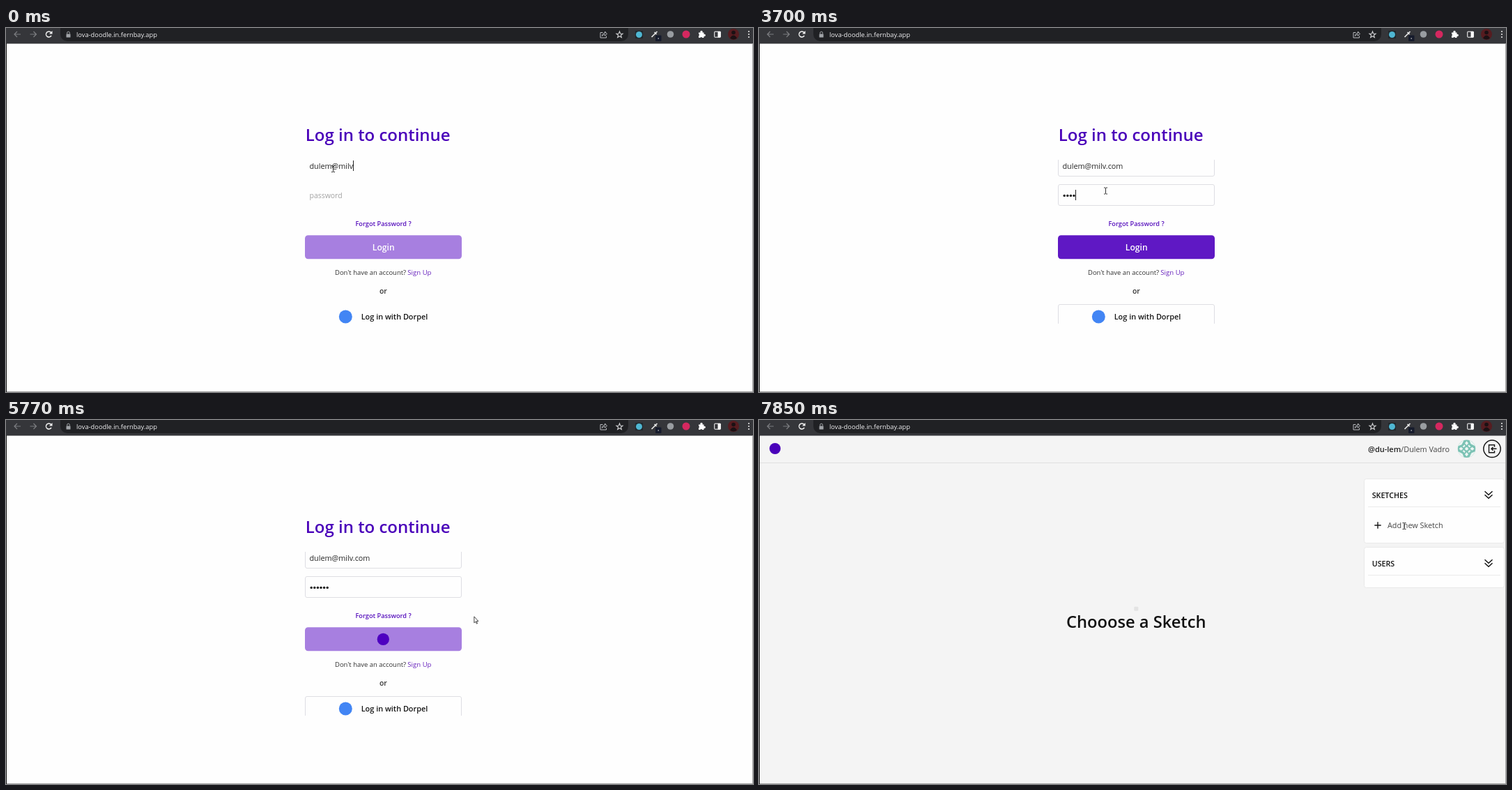
Animation, 1072 px wide and 522 px high, one loop 8000 ms. Source, as an HTML page with a canvas:

```html
<!DOCTYPE html>
<html lang="en">
<head>
<meta charset="utf-8">
<title>Login flow</title>
<style>
  html, body { margin: 0; width: 100%; height: 100%; overflow: hidden; background: #fff; }
  canvas { display: block; width: 1072px; height: 522px; }
</style>
</head>
<body>
<canvas id="stage" width="1072" height="522"></canvas>
<script>
const ctx = document.getElementById('stage').getContext('2d');
const LOOP = 8000;
const PURPLE = '#4a02ba';
const EMAIL = 'dulem@milv.com';
const EMAIL_KEYS = [90, 240, 340, 490];
const PASSWORD_KEYS = [3040, 3220, 3440, 3700, 3880, 4120];
const PASSWORD_FOCUS = 2030, SUBMIT = 5390, HOME = 6650, HOME_READY = 6980;

// Pointer track: time, x, y
const TRACK = [
  [1040, 469.5, 202], [1600, 553, 316], [1690, 553, 316], [1830, 570, 306], [2020, 497.5, 233.5],
  [4640, 497.5, 233.5], [5220, 540, 314], [5460, 540, 314], [6030, 772, 257], [6230, 756, 250.5],
  [7340, 756, 250.5], [7850, 926, 152]
];

const clamp = v => Math.max(0, Math.min(1, v));
const ease = v => { v = clamp(v); return v * v * (3 - 2 * v); };
const countPast = (times, t) => times.filter(k => t >= k).length;

function pointerAt(t) {
  const next = TRACK.findIndex(k => t < k[0]);
  if (next === 0) return TRACK[0].slice(1);
  if (next < 0) return TRACK[TRACK.length - 1].slice(1);
  const a = TRACK[next - 1], b = TRACK[next];
  const p = ease((t - a[0]) / (b[0] - a[0]));
  return [a[1] + (b[1] - a[1]) * p, a[2] + (b[2] - a[2]) * p];
}

function font(size, weight = 400) {
  ctx.font = `${weight} ${size}px "Open Sans", "Noto Sans", sans-serif`;
}

function text(str, x, y, size, color, weight, align = 'left') {
  font(size, weight);
  ctx.textAlign = align;
  ctx.fillStyle = color;
  ctx.fillText(str, x, y);
}

function rect(x, y, w, h, color) {
  ctx.fillStyle = color;
  ctx.fillRect(x, y, w, h);
}

function box(x, y, w, h, r, fill, stroke) {
  ctx.beginPath();
  ctx.roundRect(x, y, w, h, r);
  paint(fill, stroke, 1);
}

function disc(x, y, r, fill, stroke, width = 1) {
  ctx.beginPath();
  ctx.arc(x, y, Math.max(0, r), 0, Math.PI * 2);
  paint(fill, stroke, width);
}

function path(d, x, y, fill, stroke, width = 1) {
  ctx.save();
  ctx.translate(x, y);
  const p = new Path2D(d);
  if (fill) { ctx.fillStyle = fill; ctx.fill(p); }
  if (stroke) { ctx.strokeStyle = stroke; ctx.lineWidth = width; ctx.stroke(p); }
  ctx.restore();
}

function paint(fill, stroke, width) {
  if (fill) { ctx.fillStyle = fill; ctx.fill(); }
  if (stroke) { ctx.strokeStyle = stroke; ctx.lineWidth = width; ctx.stroke(); }
}

function mix(a, b, p) {
  return `rgb(${a.map((v, i) => Math.round(v + (b[i] - v) * p)).join()})`;
}

function drawToolbar() {
  rect(0, 0, 1072, 22.5, '#35363a');
  box(78, -12, 815, 31, 10, '#202124');
  path('M4.5 0H-4.5M-.5 -4L-4.5 0L-.5 4', 16.5, 9, null, '#7d7e81', 1.2);
  path('M-4.5 0H4.5M.5 -4L4.5 0L.5 4', 39, 9, null, '#7d7e81', 1.2);
  ctx.beginPath();
  ctx.arc(61.5, 9, 4, .5, 5.6);
  paint(null, '#f1f1f1', 1.5);
  path('M5 -5V-.5H.5Z', 61.5, 9, '#f1f1f1');
  box(86.5, 8.5, 6, 5, .5, '#a0a3a7');
  path('M-1.8 0V-1.5A1.8 1.8 0 0 1 1.8 -1.5V0', 89.5, 8.5, null, '#a0a3a7');
  text('lova-doodle.in.fernbay.app', 101, 13, 9.3, '#f0f0f2');

  path('M-1 -3H-4.5V4.5H4V2M-2 2C-2 -1 0 -2 2 -2V-4.5L5 -1L2 1.5V0C0 0 -1 .5 -2 2Z', 857.5, 9.5, null, '#b9bbbf');
  const star = Array.from({ length: 10 }, (_, i) => {
    const r = i % 2 ? 2 : 4.8, a = i * Math.PI / 5;
    return `${r * Math.sin(a)} ${-r * Math.cos(a)}`;
  });
  path(`M${star.join('L')}Z`, 880.5, 9.7, null, '#d5d6d8', 1.1);
  rect(903, 4, 11, 11, '#20282d');
  disc(908.5, 9.5, 4.5, '#4fb7d3');
  path('M-4 4L1.5 -1.5M0 -3L3 0M2 -2L4 -4', 930.5, 9, null, '#e8e8e8', 1.7);
  box(932, 10.5, 8.5, 8.5, 1, '#161b2c');
  disc(936.2, 15, .8, '#ddd');
  disc(953.5, 9, 4.8, '#999da1');
  disc(976, 9, 5.5, '#d5285f');
  path('M-4 -2.5H-1.4A1.7 1.7 0 1 1 1.4 -2.5H3.5V0A1.6 1.6 0 1 1 3.5 2.8V5H1A1.4 1.4 0 0 0 -1.6 5H-4V2.2A1.4 1.4 0 0 0 -4 -.4Z', 998, 9, '#fff');
  box(1016.7, 5.2, 8.6, 8, .5, null, '#fff');
  rect(1021.5, 5, 4, 8.5, '#fff');
  disc(1044, 9, 8, '#561c20');
  disc(1044, 6.5, 2.8, '#1b1114');
  path('M-5 0Q0 -8 5 0Q0 4 -5 0Z', 1044, 14.5, '#1b1114');
  for (const y of [5, 9, 13]) disc(1066, y, 1.1, '#e4e4e4');
}

function drawEdges() {
  rect(0, 22, 1, 500, '#151515');
  rect(1071, 22, 1, 500, '#a5a5a5');
  rect(1, 521, 1071, 1, '#a5a5a5');
}

// Field outlines only show where the screen has been repainted.
function drawOutlines(t) {
  ctx.save();
  ctx.beginPath();
  if (t >= 1860) {
    ctx.rect(429, 189, 226, 235);
  } else {
    if (t >= 1170) ctx.rect(468, 204, 28, 14);
    if (t >= 1220) ctx.rect(476, 218, 20, 14);
    if (t >= 1330) ctx.rect(489, 245, 30, 15);
    if (t >= 1550) ctx.rect(522, 189, 35, 143);
  }
  ctx.clip();
  for (const [y, h] of [[182.5, 30], [224.5, 30], [396.5, 34]]) {
    box(429.5, y, 224, h, 2.5, null, '#dedee3');
  }
  ctx.restore();
}

function drawCaret(t) {
  const inEmail = t < PASSWORD_FOCUS;
  if (t >= 5250) return;
  const keys = inEmail ? EMAIL_KEYS : [PASSWORD_FOCUS, ...PASSWORD_KEYS];
  const last = Math.max(0, ...keys.filter(k => k <= t));
  if (Math.floor((t - last) / 535) % 2) return;
  if (inEmail) {
    font(10.8);
    const typed = EMAIL.slice(0, 10 + countPast(EMAIL_KEYS, t));
    rect(Math.round(435.5 + ctx.measureText(typed).width), 190, 1, 15, '#222');
  } else {
    rect(Math.floor(436 + 4.6 * countPast(PASSWORD_KEYS, t)), 232, 1, 15, '#222');
  }
}

function drawButton(t) {
  const enabled = ease((t - 3030) / 170) * (1 - ease((t - SUBMIT + 25) / 230));
  box(429, 297.3, 225, 34, 4.5, mix([167, 127, 224], [95, 24, 196], enabled));
  if (t < SUBMIT) {
    text('Login', 541.7, 319, 12.1, '#fff', 600, 'center');
  } else {
    const scale = 1 - ((t - 6330) / 1300) ** 2;
    disc(541.3, 314.4, 10.6 * scale, '#4e00c0');
  }
}

function drawLogin(t) {
  rect(0, 22, 1072, 500, '#fefefe');
  text('Log in to continue', 533.7, 161.7, 24, PURPLE, 600, 'center');
  drawOutlines(t);
  text(EMAIL.slice(0, 10 + countPast(EMAIL_KEYS, t)), 435.5, 202, 10.8, '#262626');

  const dots = countPast(PASSWORD_KEYS, t);
  if (!dots) text('password', 435.5, 244, 10.45, '#a2a2a2');
  for (let i = 0; i < dots; i++) disc(438.2 + 4.6 * i, 240.4, 1.7, '#151515');
  drawCaret(t);

  text('Forgot Password ?', 541.5, 283.5, 9.2, '#560fbd', 600, 'center');
  drawButton(t);
  text("Don't have an account?", 472, 354, 9.45, '#303030');
  text('Sign Up', 576.3, 354, 9.6, '#6722bd');
  text('or', 541.3, 381, 10.4, '#333', 600, 'center');
  disc(487.3, 414, 9.5, '#4285f4');
  text('Log in with Dorpel', 509.7, 418.4, 10.9, '#151515', 600);
}

function drawAvatar(x, y) {
  ctx.save();
  disc(x, y, 12.7, '#7cc2b4');
  ctx.clip();
  ctx.translate(x, y);
  for (let i = 0; i < 4; i++) {
    ctx.rotate(Math.PI / 2);
    path('M0 -5L2.5 -8L0 -11L-2.5 -8ZM4 -12L6 -7L12 -4V-12ZM3 -6L6 -3L4 -2L2 -4Z', 0, 0, '#edf5f3');
  }
  disc(0, 0, 2.2, '#edf5f3');
  ctx.restore();
}

function drawPanel(title, y, h) {
  box(868.5, y + .5, 201, h, 3, '#fefefe', '#e9e9e9');
  text(title, 879.7, y + 28, 10.7, '#111', 600);
  path('M-5.5 -5L0 0L5.5 -5M-5.5 0L0 5L5.5 0', 1047, y + 23.3, null, '#111', 1.4);
  rect(874, y + 40, 190, 1, '#ebebeb');
}

function drawHome(t) {
  rect(0, 22, 1072, 500, '#f4f4f4');
  rect(1, 61, 1070, 1, '#e0e0e0');
  disc(23, 41, 8, PURPLE);
  text('@du-lem', 874, 46, 11, '#222', 600);
  text('/Dulem Vadro', 921.3, 46, 10.8, '#444');
  drawAvatar(1015.5, 41.3);
  disc(1052, 41.3, 12.2, null, '#161616', 1.5);
  path('M3.5 -2.5V-5.5H-4.5V5.5H3.5V2.5M6.5 0H-1M1.5 -2.5L-1 0L1.5 2.5', 1052, 41.3, null, '#161616', 1.4);

  if (t < HOME_READY) {
    disc(541.3, 270.7, 3 * ease((t - HOME) / (HOME_READY - HOME)), PURPLE);
    return;
  }
  box(538.3, 267.7, 6, 6, 1, '#e3e3e3');
  text('Chooose a Sketch', 541.2, 298, 23.7, '#111', 600, 'center');
  drawPanel('SKETCHES', 84, 92);
  path('M-4.7 0H4.7M0 -4.7V4.7', 888, 151, null, '#161616', 1.4);
  text('Add new Sketch', 902, 155.3, 10.8, '#444');
  drawPanel('USERS', 182, 58);
}

function drawPointer(t) {
  const [x, y] = pointerAt(t);
  const over = (l, top, r, bottom) => x > l && x < r && y > top && y < bottom;
  const login = t < HOME;
  const onText = login
    ? over(429, 182, 654, 213) || over(429, 225, 654, 255)
    : over(902, 144, 982, 159);
  const onLink = login && (over(429, 297, 654, 331) || over(501, 275, 582, 285));

  if (onText) {
    path('M-2.5 -4.5H-.7L0 -4L.7 -4.5H2.5M0 -4V4M-2.5 4.5H-.7L0 4L.7 4.5H2.5', x, y, null, '#333', 1);
  } else if (onLink) {
    path('M-1.2 .8Q0 -.8 1.2 .8V5L4 5.6Q5.3 6 5 8L4 13H-1.5L-4 8.8Q-4 7 -2.5 7.7L-1.2 9Z', x, y + .5, '#fff', '#222', .9);
  } else {
    path('M0 0V9L2.1 7.1L3.5 10.3L4.8 9.7L3.4 6.6H6Z', x, y + .3, '#fff', '#333', .9);
  }
}

function render(now) {
  const t = now % LOOP;
  ctx.clearRect(0, 0, 1072, 522);
  (t < HOME ? drawLogin : drawHome)(t);
  drawToolbar();
  drawEdges();
  drawPointer(t);
}

const start = performance.now();
function tick() {
  render(performance.now() - start);
  requestAnimationFrame(tick);
}
tick();
</script>
</body>
</html>
```
